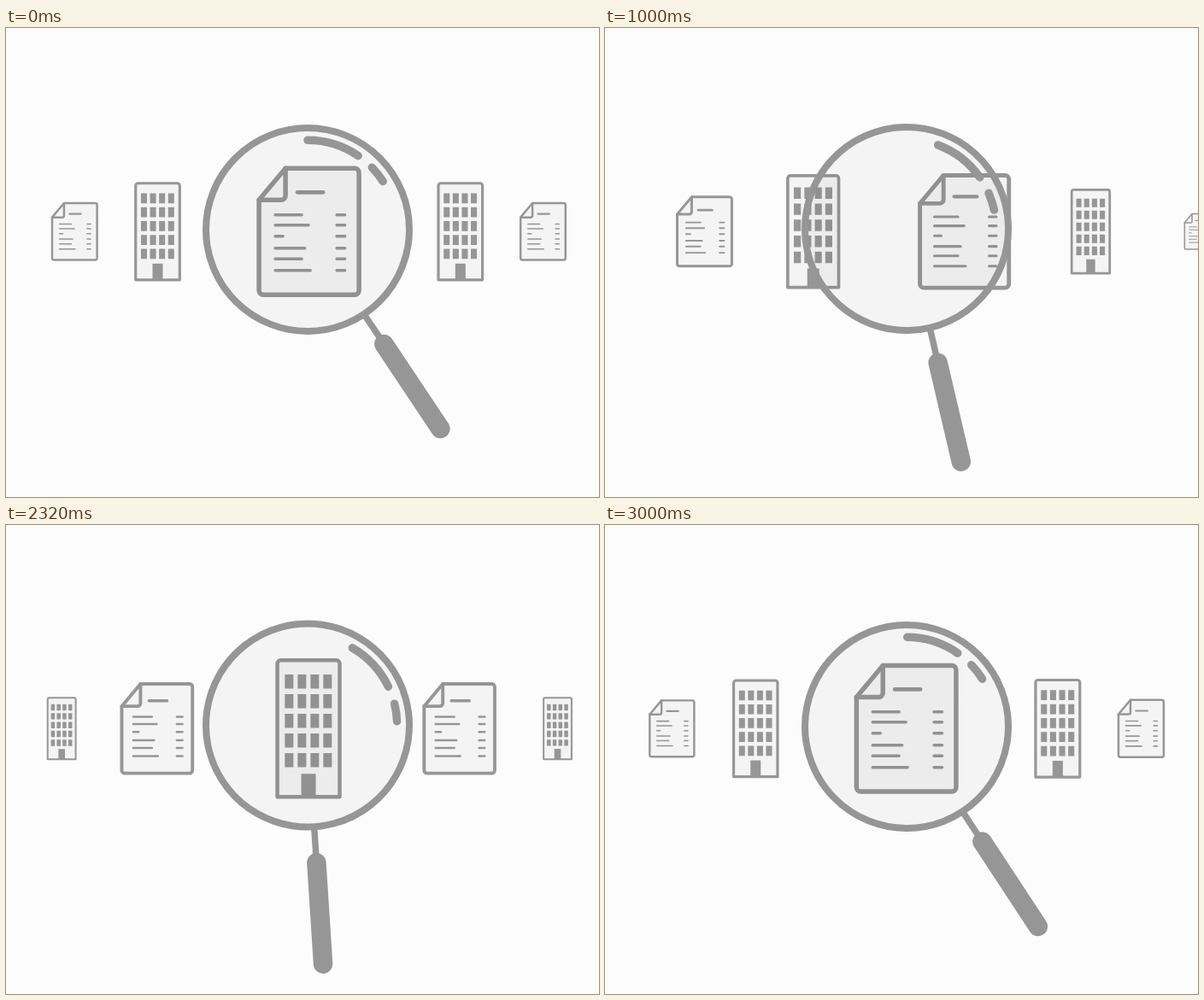
An HTML page that plays this animation: 694x549 px, repeating every 3040 ms.

```html
<!DOCTYPE html>
<html lang="en">
<head>
<meta charset="utf-8">
<title>Searching records</title>
<style>
  html, body { margin: 0; width: 100%; height: 100%; overflow: hidden; background: #fcfcfc; }
  svg { display: block; width: 100%; height: 100%; }
  .line { fill: none; stroke: #969696; stroke-linecap: round; stroke-linejoin: round; }
  .tint { fill: #000; fill-opacity: .032; }
  .solid { fill: #969696; }
</style>
</head>
<body>
<svg viewBox="0 0 694 549" xmlns="http://www.w3.org/2000/svg">
  <defs>
    <g id="doc">
      <path class="line tint" stroke-width="5.5" d="M-27.5-74H53.5a5 5 0 0 1 5 5V69a5 5 0 0 1-5 5H-53.5a5 5 0 0 1-5-5V-37Z"/>
      <path class="line" stroke-width="5.5" d="M-27.5-74V-42a5 5 0 0 1-5 5H-58.5"/>
      <path class="line" stroke-width="4.8" d="M-13.5-46H16.5"/>
      <path class="line" stroke-width="3.5" id="rows"/>
    </g>
    <g id="tower">
      <path class="line tint" stroke-width="4.5" d="M-36.5 80V-76a4 4 0 0 1 4-4H32.5a4 4 0 0 1 4 4V80Z"/>
      <path class="solid" id="panes"/>
    </g>
  </defs>
  <g id="icons"></g>
  <g id="glass">
    <circle class="line tint" r="119" stroke-width="8"/>
    <path class="line" id="shine" stroke-width="9.5"/>
    <path class="line" stroke-width="7.5" d="M0 122V158"/>
    <path class="line" stroke-width="22.5" d="M0 161V280"/>
  </g>
</svg>
<script>
const LOOP = 3040, STEP = 40, MID_Y = 238.3;
const $ = id => document.getElementById(id);

// Document rows: left text of varied length, short amounts on the right
const rowY = [-19.5, -7.5, 5.5, 19.5, 32, 45.5];
const rowEnd = [-8.5, -0.5, -30.5, -5, -8.5, 1.5];
$('rows').setAttribute('d', rowY.map((y, i) =>
  `M-39.5 ${y}H${rowEnd[i]}M32.5 ${y}H42`).join(''));

// Tower windows and door
let panes = 'M-8.5 53H8.5V80H-8.5Z';
for (let r = 0; r < 5; r++)
  for (let c = 0; c < 4; c++)
    panes += `M${-27.7 + c * 15} ${-63.3 + r * 23}h10v16.5h-10Z`;
$('panes').setAttribute('d', panes);

// Highlights on the lens; angles in degrees from the top
function arc(r, from, to) {
  const at = a => `${r * Math.sin(a * Math.PI / 180)} ${-r * Math.cos(a * Math.PI / 180)}`;
  return `M${at(from)}A${r} ${r} 0 0 1 ${at(to)}`;
}
$('shine').setAttribute('d', arc(104.7, 0, 34.4) + arc(104.7, 46, 57.4));

// Slot positions for the two resting layouts, and the size at each slot
const docMid = [-112, 80.3, 177.5, 354.6, 531.8, 628.5, 822];
const towerMid = [-97, 65, 176.6, 353.8, 530.5, 645.3, 805];
const size = [0, .45, .707, 1, .707, .45, 0];

const icons = Array.from({ length: 6 }, () => {
  const use = document.createElementNS('http://www.w3.org/2000/svg', 'use');
  $('icons').appendChild(use);
  return use;
});

const mix = (a, b, p) => a + (b - a) * p;
const smooth = s => s * s * (3 - 2 * s);

// Ease between two times; x1 and x2 are the handles of a flat-ended bezier
function ease(t, start, end, x1, x2) {
  const x = (t - start) / (end - start);
  if (x <= 0) return 0;
  if (x >= 1) return 1;
  let lo = 0, hi = 1;
  for (let i = 0; i < 30; i++) {
    const s = (lo + hi) / 2, q = 1 - s;
    if (3 * x1 * s * q * q + 3 * x2 * s * s * q + s * s * s < x) lo = s;
    else hi = s;
  }
  return smooth(lo);
}

function draw(t) {
  const first = t < 1480;
  const slide = first ? ease(t, 540, 1440, .8, .325) : ease(t, 2304, 3046, 1 / 3, 2 / 3);
  const turn = first ? ease(t, 540, 1440, .584, .256)
                     : 1 - ease(t, 2355, 3046, 1 / 3, 2 / 3);
  const from = first ? docMid : towerMid;
  const to = first ? towerMid : docMid;

  icons.forEach((icon, k) => {
    const late = first && k === 4;   // this one sets off and settles more softly
    const p = late ? mix(slide, smooth(slide), .9) : slide;
    const x = mix(from[k], to[k + 1], p);
    const s = mix(size[k], size[k + 1], slide);
    icon.setAttribute('href', (k % 2 === 1) === first ? '#doc' : '#tower');
    icon.setAttribute('transform', `translate(${x} ${MID_Y}) scale(${s})`);
  });

  // The shine turns with the handle
  const a = 30 * turn;
  $('glass').setAttribute('transform', `translate(353 ${236 - 1.5 * turn}) rotate(${a})`);
}

// The handle leans away from the shine's zero angle
document.querySelectorAll('#glass path:not(#shine)').forEach(p =>
  p.setAttribute('transform', 'rotate(-33.7)'));

const begin = performance.now();
function tick() {
  const t = (performance.now() - begin) % LOOP;
  draw(Math.floor(t / STEP) * STEP);
  requestAnimationFrame(tick);
}
tick();
</script>
</body>
</html>
```
